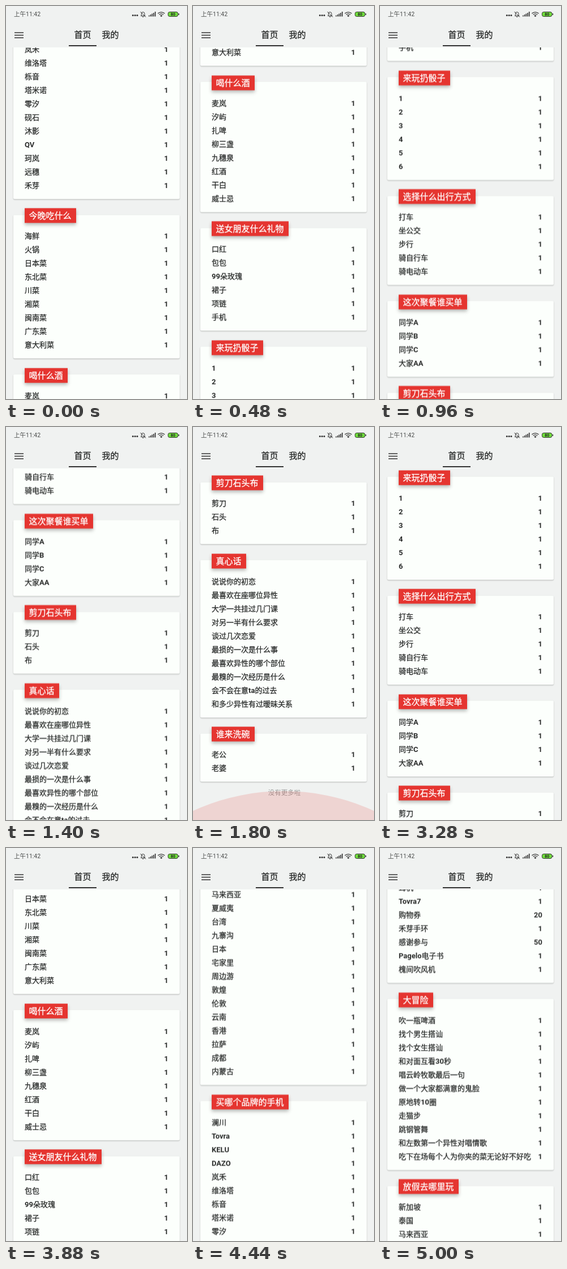
An HTML page that plays this animation: 320 by 693 pixels, repeating every 5040 ms.

```html
<!DOCTYPE html>
<html lang="zh-CN">
<head>
<meta charset="utf-8">
<title>首页</title>
<style>
html, body { margin: 0; width: 100%; height: 100%; overflow: hidden; background: #f0f2f1; }
body { position: relative; font-family: Roboto, "Noto Sans CJK SC", "Noto Sans CJK", sans-serif; color: #2b2d2c; }
#stage { position: absolute; left: 0; top: 0; width: 320px; height: 693px; overflow: hidden; background: #f0f2f1; }
#list { position: absolute; left: 0; top: 0; width: 320px; will-change: transform; }
.card { position: absolute; left: 13px; width: 294px; box-sizing: border-box; padding: 25.5px 20px 12px;
  background: #fcfffc; border-radius: 2px; box-shadow: 0 1px 2px rgba(0,0,0,.26); }
.label, .row span, .tab { -webkit-text-stroke: .3px; }
.label { position: absolute; left: 19.5px; top: -11.5px; height: 26px; padding: 0 8px; line-height: 26px;
  font-size: 15px; font-weight: 500; color: #fff; background: #e53530; white-space: nowrap;
  box-shadow: 0 3px 6px rgba(0,0,0,.27); }
.row { display: flex; justify-content: space-between; height: 24px; line-height: 24px;
  font-size: 13px; font-weight: 500; white-space: nowrap; }
b { font-weight: 700; -webkit-text-stroke: 0; }
#end { position: absolute; left: 1.5px; width: 320px; text-align: center; font-size: 11.5px; line-height: 16px; color: #9a9c9b; }
#head { position: absolute; left: 0; top: 0; width: 320px; height: 73px; background: #f0f2f1; }
#clock { position: absolute; left: 14px; top: 7px; font-size: 10.5px; line-height: 16px; color: #4a4c4b; white-space: nowrap; }
.tab { position: absolute; top: 39px; width: 49px; text-align: center; font-size: 15px; font-weight: 500; line-height: 25px; }
svg { position: absolute; left: 0; top: 0; }
</style>
</head>
<body>
<div id="stage">
  <div id="list"></div>
  <svg width="320" height="693"><ellipse id="glow" cx="160" cy="693" rx="384" ry="0" fill="#e53935"/></svg>
  <div id="head">
    <div id="clock">上午11:42</div>
    <div class="tab" style="left:111px">首页</div>
    <div class="tab" style="left:160px">我的</div>
    <svg width="320" height="73" fill="none" stroke="#333">
      <path d="M15 47h16M15 51.5h16M15 56h16" stroke-width="1.7"/>
      <path d="M111 70h49" stroke-width="1.8"/>
      <g fill="#333" stroke="none">
        <circle cx="224.4" cy="16.5" r="1.5"/><circle cx="228.2" cy="16.5" r="1.5"/><circle cx="232" cy="16.5" r="1.5"/>
      </g>
      <path d="M238.5 17.5h7.5l-1-1.5v-2.5a2.8 2.8 0 0 0-5.6 0V16zM241 19.2h2.5M237.5 10l9.5 9.5"/>
      <path d="M253 18.5v-2M255.7 18.5v-3.5M258.4 18.5v-5M261.1 18.5v-6.5M263.8 18.5v-8.5" stroke-width="1.6"/>
      <path d="M268.5 13.3a8.5 8.5 0 0 1 12 0M270.6 15.4a5.5 5.5 0 0 1 7.8 0" stroke-width="1.3"/>
      <path d="M272.4 17a3 3 0 0 1 4.2 0l-2.1 2.2z" fill="#333" stroke="none"/>
      <rect x="286.5" y="10.5" width="17.5" height="8" rx="3" fill="#6fdc3c"/>
      <path d="M305.5 13v3" stroke-width="1.3"/>
      <text x="295.2" y="17.1" font-size="7" font-weight="700" text-anchor="middle" fill="#222" stroke="none">80</text>
    </svg>
  </div>
</div>
<script>
(() => {
  const LOOP = 5040, STEP = 40, ROW = 24, BOTTOM = 693;
  const list = document.getElementById('list');
  const glow = document.getElementById('glow');

  // title: items, with an optional count after a colon
  const cards = [
    ['年会抽奖', '耳机 Tovra7 购物券:20 禾芽手环 感谢参与:50 Pagelo电子书 槐间吹风机'],
    ['大冒险', '吹一瓶啤酒 找个男生搭讪 找个女生搭讪 和对面互看30秒 唱云岭牧歌最后一句 做一个大家都满意的鬼脸 原地转10圈 走猫步 跳钢管舞 和左数第一个异性对唱情歌 吃下在场每个人为你夹的菜无论好不好吃'],
    ['放假去哪里玩', '新加坡 泰国 马来西亚 夏威夷 台湾 九寨沟 日本 宅家里 周边游 敦煌 伦敦 云南 香港 拉萨 成都 内蒙古'],
    ['买哪个品牌的手机', '澜川 Tovra KELU DAZO 岚禾 维洛塔 栎音 塔米诺 零汐 砚石 沐影 QV 珂岚 远穗 禾芽'],
    ['今晚吃什么', '海鲜 火锅 日本菜 东北菜 川菜 湘菜 闽南菜 广东菜 意大利菜'],
    ['喝什么酒', '麦岚 汐屿 扎啤 柳三盏 九穗泉 红酒 干白 威士忌'],
    ['送女朋友什么礼物', '口红 包包 99朵玫瑰 裙子 项链 手机'],
    ['来玩扔骰子', '1 2 3 4 5 6'],
    ['选择什么出行方式', '打车 坐公交 步行 骑自行车 骑电动车'],
    ['这次聚餐谁买单', '同学A 同学B 同学C 大家AA'],
    ['剪刀石头布', '剪刀 石头 布'],
    ['真心话', '说说你的初恋 最喜欢在座哪位异性 大学一共挂过几门课 对另一半有什么要求 谈过几次恋爱 最损的一次是什么事 最喜欢异性的哪个部位 最糗的一次经历是什么 会不会在意ta的过去 和多少异性有过暧昧关系'],
    ['谁来洗碗', '老公 老婆']
  ];

  function rowHtml(item) {
    const [name, count = 1] = item.split(':');
    const text = name.replace(/\w+/g, '<b>$&</b>');
    return `<div class="row"><span>${text}</span><b>${count}</b></div>`;
  }

  // The second card sits at list position 0.
  let y = -233.5, html = '';
  for (const [title, items] of cards) {
    const rows = items.split(' ');
    html += `<div class="card" style="top:${y}px"><div class="label">${title}</div>${rows.map(rowHtml).join('')}</div>`;
    y += 65.5 + ROW * rows.length;
  }
  list.innerHTML = html + `<div id="end" style="top:${y - 17}px">没有更多啦</div>`;

  // Each fling is a parabola through three (time, offset) points.
  const flings = [
    [40, 836.5, 960, 1828, 1750, 2412.5],
    [2880, 2412.5, 3280, 1865.5, 3880, 1200.5],
    [3880, 1200.5, 4440, 333, 5000, -266]
  ];

  function scrollAt(t) {
    const [a, ya, b, yb, c, yc] = flings.filter(f => t >= f[0]).pop() || flings[0];
    const x = Math.min(Math.max(t, a), c);
    return ya * (x - b) * (x - c) / ((a - b) * (a - c))
         + yb * (x - a) * (x - c) / ((b - a) * (b - c))
         + yc * (x - a) * (x - b) / ((c - a) * (c - b));
  }

  // Overscroll glow: quick rise, decelerating retreat.
  function glowAt(t) {
    if (t < 1750 || t > 2360) return 0;
    return t < 1800 ? 1 - ((1800 - t) / 50) ** 2 : (1 - (t - 1800) / 560) ** 2;
  }

  function draw(now) {
    const t = Math.floor(now % LOOP / STEP) * STEP;
    list.style.transform = `translateY(${-scrollAt(t)}px)`;
    const k = glowAt(t);
    glow.setAttribute('cy', BOTTOM + 333 * k);
    glow.setAttribute('ry', 384 * k);
    glow.setAttribute('opacity', 0.16 * k);
  }

  const start = performance.now();
  function tick() {
    draw(performance.now() - start);
    requestAnimationFrame(tick);
  }
  tick();
})();
</script>
</body>
</html>
```
